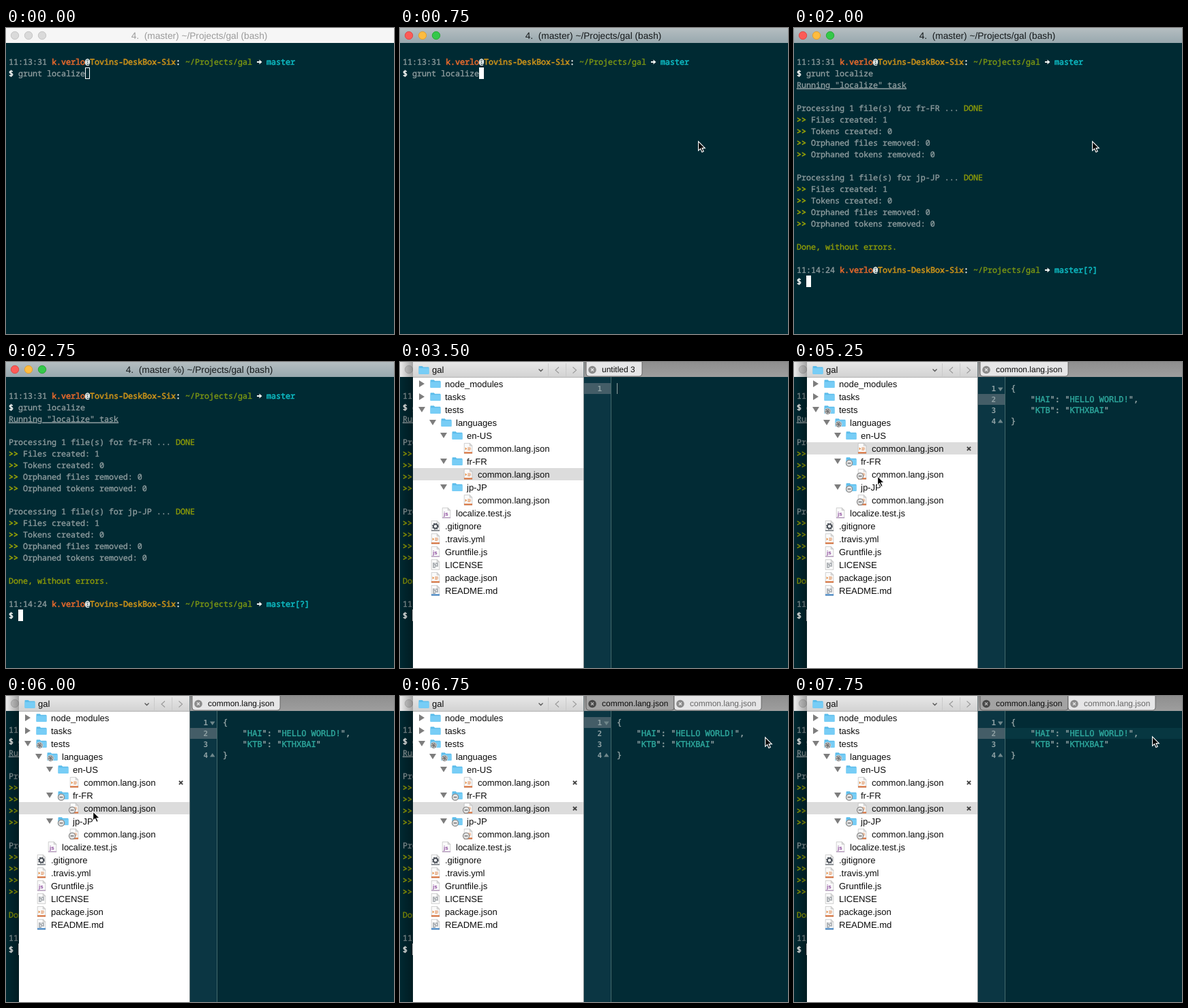
Write an HTML page that moves like this. It is 569 px wide and 450 px high and loops after 8000 ms.

```html
<!DOCTYPE html>
<html lang="en">
<head>
<meta charset="utf-8">
<title>Localize task demo</title>
<style>
  html, body { margin: 0; width: 100%; height: 100%; overflow: hidden; background: #002a33; }
  svg { display: block; }
  text { white-space: pre; text-rendering: geometricPrecision; }
  .ui { font-family: "Liberation Sans", Arial, sans-serif; font-size: 13px; fill: #0c0c0c; }
  .title { font-size: 13.7px; text-anchor: middle; }
  .tab { font-size: 12px; }
  .term { font-family: "Noto Sans Mono", "DejaVu Sans Mono", monospace; font-size: 11.667px; stroke-width: .35px; }
  .strong { stroke-width: .65px; }
  .under { text-decoration: underline 1px; text-underline-offset: 1.8px; }
  .code { font-family: "DejaVu Sans Mono", monospace; font-size: 11.96px; stroke-width: .35px; }
  .num { font-family: "DejaVu Sans Mono", monospace; font-size: 11px; font-weight: bold; text-anchor: end; }
</style>
</head>
<body>
<svg id="stage" width="569" height="450" viewBox="0 0 569 450">
  <defs>
    <linearGradient id="activeBar" x2="0" y2="1">
      <stop stop-color="#b5bec1"/><stop offset="1" stop-color="#98a8ae"/>
    </linearGradient>
    <linearGradient id="paneBar" x2="0" y2="1">
      <stop stop-color="#e8e8e8"/><stop offset="1" stop-color="#d2d2d2"/>
    </linearGradient>
    <linearGradient id="tabBar" x2="0" y2="1">
      <stop stop-color="#8f8f8f"/><stop offset="1" stop-color="#9e9e9e"/>
    </linearGradient>
    <linearGradient id="shade">
      <stop stop-opacity=".04"/><stop offset="1" stop-opacity=".34"/>
    </linearGradient>
    <symbol id="folder" viewBox="0 0 16 16" overflow="visible">
      <path d="M.5 3.2q0-.9.9-.9h4.4l1.3 1.5h7.5q.9 0 .9.9v8.4q0 .9-.9.9H1.4q-.9 0-.9-.9z" fill="#5cbdeb"/>
      <path d="M.5 5.2h15v7.9q0 .9-.9.9H1.4q-.9 0-.9-.9z" fill="#77cdf6"/>
    </symbol>
    <symbol id="page" viewBox="0 0 16 16" overflow="visible">
      <path d="M2.2.6h8l3.6 3.6v11.2H2.2z" fill="#fafafa" stroke="#a4a4a4" stroke-width=".5"/>
      <path d="M10.2.6v3.6h3.6z" fill="#ddd" stroke="#a4a4a4" stroke-width=".4"/>
    </symbol>
    <symbol id="data" viewBox="0 0 16 16" overflow="visible">
      <use href="#page"/>
      <path d="M2 13.4h12v2.1H2z" fill="#d9713a"/>
      <path d="M3.7 6.6l2.5 1.9-2.5 1.9z" fill="#e58a3c"/>
      <path d="M7.2 7h4.5M7.2 8.8h5M7.2 10.4h4" stroke="#dd8a52" stroke-width=".9"/>
    </symbol>
    <symbol id="js" viewBox="0 0 16 16" overflow="visible">
      <use href="#page"/>
      <text x="4.1" y="11.6" font-family="Liberation Sans, sans-serif" font-size="8" font-weight="bold" fill="#8b4a9c">js</text>
      <path d="M2 14.2h12v1.3H2z" fill="#b79ac0"/>
    </symbol>
    <symbol id="gear" viewBox="0 0 16 16" overflow="visible">
      <use href="#page"/>
      <circle cx="8" cy="8.6" r="3.2" fill="none" stroke="#4a5058" stroke-width="2"/>
      <circle cx="8" cy="8.6" r="4.4" fill="none" stroke="#4a5058" stroke-width="1.2" stroke-dasharray="1.7 1.75"/>
      <path d="M2 14.2h12v1.3H2z" fill="#666c73"/>
    </symbol>
    <symbol id="plain" viewBox="0 0 16 16" overflow="visible">
      <use href="#page"/>
      <path d="M4 6h3m1 0h4M4 8h5m1 0h2M4 10h2m1 0h5M4 12h4" stroke="#687078" stroke-width="1"/>
    </symbol>
    <symbol id="doc" viewBox="0 0 16 16" overflow="visible">
      <use href="#plain"/><path d="M2 13.4h12v2.1H2z" fill="#3f83c4"/>
    </symbol>
    <symbol id="minus" viewBox="0 0 16 16" overflow="visible">
      <circle cx="5" cy="10.8" r="4.6" fill="#e4e4e4" stroke="#8a8a8a" stroke-width="1.2"/>
      <path d="M2.6 10.8h4.8" stroke="#777" stroke-width="1.5"/>
    </symbol>
    <symbol id="dots" viewBox="0 0 16 16" overflow="visible">
      <circle cx="5.4" cy="10.6" r="4.6" fill="#777" stroke="#eee" stroke-width=".8"/>
      <circle cx="5.4" cy="10.6" r="2.8" fill="none" stroke="#eee" stroke-width="1.3" stroke-dasharray="1.4 1.5"/>
    </symbol>
  </defs>
</svg>
<script>
const LOOP = 8000, SWITCH = 3500, OPEN_ONE = 4750, OPEN_TWO = 6250;
const stage = document.getElementById('stage');
const timed = [];

function add(parent, tag, attrs, text) {
  const node = document.createElementNS('http://www.w3.org/2000/svg', tag);
  for (const key in attrs) node.setAttribute(key, attrs[key]);
  if (text !== undefined) node.textContent = text;
  parent.appendChild(node);
  return node;
}
function during(node, ...spans) {
  timed.push({ node, spans });
  return node;
}
const group = (parent = stage) => add(parent, 'g', {});
const box = (p, x, y, width, height, fill, more) => add(p, 'rect', { x, y, width, height, fill, ...more });
const path = (p, d, more) => add(p, 'path', { d, fill: 'none', ...more });
const dot = (p, cx, cy, r, fill, stroke = 'none') => add(p, 'circle', { cx, cy, r, fill, stroke });
const label = (p, x, y, text, cls, more) => add(p, 'text', { x, y, class: cls, ...more }, text);
const icon = (p, name, x, y, size = 16) => add(p, 'use', { href: '#' + name, x, y, width: size, height: size });

// Terminal
const GRAY = '#8f9d9f', GREEN = '#8f9d08', WHITE = '#f2f4f2', CYAN = '#0db5bd';
const term = group();
box(term, 0, 0, 569, 450, '#002a33');

function titleBar(fill, ink, lights, rims) {
  const bar = group(term);
  box(bar, 0, 0, 569, 22, fill);
  lights.forEach((color, i) => dot(bar, 13 + 20 * i, 11, 5.7, color, rims[i]));
  const title = mark => label(bar, 283.5, 15.5, `4.  (master${mark}) ~/Projects/gal (bash)`, 'ui title', { style: 'fill:' + ink });
  during(title(''), [0, 2250]);
  during(title(' %'), [2250, LOOP]);
  return bar;
}
const pale = Array(3).fill('#dadada'), paleRim = Array(3).fill('#c6c6c6');
during(titleBar('#f6f6f6', '#9b9b9b', pale, paleRim), [0, 750], [SWITCH, LOOP]);
during(titleBar('url(#activeBar)', '#15191b', ['#fc5b57', '#fdbc40', '#34c84a'], ['#df4744', '#de9f34', '#27aa35']), [750, SWITCH]);

function line(parent, row, ...parts) {
  let col = 0;
  for (const [text, color, cls = ''] of parts) {
    label(parent, 4 + 7 * col, 53.8 + 17 * row, text, 'term ' + cls, { fill: color, stroke: color });
    col += text.length;
  }
}
function prompt(parent, row, time, branch) {
  line(parent, row, [time + ' ', GRAY], ['k.verlo', '#e2682c', 'strong'], ['@', WHITE, 'strong'],
    ['Tovins-DeskBox-Six', '#c58f1a', 'strong'], [':', WHITE, 'strong'], [' ~/Projects/gal ', '#7f9a12'],
    ['  ', WHITE], [branch, CYAN, 'strong']);
  const y = 50 + 17 * row;
  path(parent, `M368 ${y}h4`, { stroke: WHITE, 'stroke-width': 2 });
  path(parent, `M371.5 ${y - 3.5}l4 3.5-4 3.5z`, { fill: WHITE });
}
const dollar = ['$ ', WHITE, 'strong'];

prompt(term, 0, '11:13:31', 'master');
line(term, 1, dollar, ['grunt localize', GRAY]);

const output = during(group(term), [2000, LOOP]);
line(output, 2, ['Running "localize" task', GRAY, 'under']);
['fr-FR', 'jp-JP'].forEach((lang, i) => {
  const top = 4 + 6 * i;
  line(output, top, [`Processing 1 file(s) for ${lang} ... `, GRAY], ['DONE', GREEN]);
  ['Files created: 1', 'Tokens created: 0', 'Orphaned files removed: 0', 'Orphaned tokens removed: 0']
    .forEach((text, n) => line(output, top + 1 + n, ['>> ', GREEN, 'strong'], [text, GRAY]));
});
line(output, 16, ['Done, without errors.', GREEN]);
prompt(output, 18, '11:14:24', 'master[?]');
line(output, 19, dollar);

const block = (col, row) => box(term, 4 + 7 * col, 41 + 17 * row, 7, 17, '#fff');
const hollow = (col, row) => box(term, 4.5 + 7 * col, 41.5 + 17 * row, 6, 16, 'none', { stroke: '#fff' });
during(hollow(16, 1), [0, 750]);
during(block(16, 1), [750, 1500]);
during(block(0, 2), [1500, 2000]);
during(block(2, 19), [2000, SWITCH]);
during(hollow(2, 19), [SWITCH, LOOP]);

// File browser
const editor = during(group(), [SWITCH, LOOP]);
box(editor, 0, 0, 19, 450, 'url(#shade)');
box(editor, 19, 0, 250, 450, '#fff');
box(editor, 19, 0, 250, 22, 'url(#paneBar)');
box(editor, 19, 22, 250, 1, '#b2b2b2');
icon(editor, 'folder', 27, 3.7);
label(editor, 47, 16, 'gal', 'ui');
path(editor, 'M203.5 10.5l3 3 3-3', { stroke: '#555', 'stroke-width': 1.3 });
path(editor, 'M217.5 2v19M243.5 2v19', { stroke: '#cacaca' });
path(editor, 'M233 7.5l-5 4.5 5 4.5M253.5 7.5l5 4.5-5 4.5', { stroke: '#999', 'stroke-width': 1.1 });

const selection = y => box(editor, 19, y, 250, 18, '#dcdcdc');
during(selection(156), [SWITCH, 4500], [6000, LOOP]);
during(selection(118), [4500, 6000]);

const LANG = 'common.lang.json';
// depth, name, icon, fold state, badge
const files = [
  [0, 'node_modules', 'folder', 'shut'],
  [0, 'tasks', 'folder', 'shut'],
  [0, 'tests', 'folder', 'open', 'dots'],
  [1, 'languages', 'folder', 'open', 'dots'],
  [2, 'en-US', 'folder', 'open'],
  [3, LANG, 'data'],
  [2, 'fr-FR', 'folder', 'open', 'minus'],
  [3, LANG, 'data', '', 'minus'],
  [2, 'jp-JP', 'folder', 'open', 'minus'],
  [3, LANG, 'data', '', 'minus'],
  [1, 'localize.test.js', 'js'],
  [0, '.gitignore', 'gear'],
  [0, '.travis.yml', 'data'],
  [0, 'Gruntfile.js', 'js'],
  [0, 'LICENSE', 'plain'],
  [0, 'package.json', 'data'],
  [0, 'README.md', 'doc']
];
files.forEach(([depth, name, kind, fold, badge], i) => {
  const x = 44 + 16 * depth, y = 32 + 19 * i;
  if (fold === 'shut') path(editor, `M${x - 16} ${y - 5}l8 5-8 5z`, { fill: '#7d7d7d' });
  if (fold === 'open') path(editor, `M${x - 17} ${y - 4}h10l-5 8z`, { fill: '#7d7d7d' });
  icon(editor, kind, x, y - 8);
  if (badge) during(icon(editor, badge, x, y - 8), [4000, LOOP]);
  label(editor, x + 22, y + 4.8, name, 'ui');
});
const cross = (p, x, y, r, stroke, width) =>
  path(p, `M${x - r} ${y - r}l${2 * r} ${2 * r}m0 ${-2 * r}l${-2 * r} ${2 * r}`, { stroke, 'stroke-width': width });
during(cross(editor, 256.5, 127.5, 2.6, '#444', 2), [OPEN_ONE, LOOP]);
during(cross(editor, 256.5, 165.5, 2.6, '#444', 2), [OPEN_TWO, LOOP]);

// Code pane
box(editor, 269, 0, 1, 450, '#6d7a7d');
box(editor, 270, 0, 299, 22, 'url(#tabBar)');
box(editor, 270, 22, 299, 428, '#022b35');
box(editor, 270, 22, 39, 428, '#0b3643');
box(editor, 309, 22, 1, 428, '#45696c');

function tab(x, width, text, on, ink = '#0c0c0c') {
  const g = group(editor);
  path(g, `M${x} -1v18q0 4 4 4h${width - 8}q4 0 4-4V-1z`, { fill: on ? '#e6e6e7' : '#a3a3a3', stroke: '#555', 'stroke-width': .8 });
  dot(g, x + 9, 11.5, 5.8, on ? '#8b8b8b' : '#484848');
  cross(g, x + 9, 11.5, 2, on ? '#e4e4e4' : '#b5b5b5', 1.4);
  label(g, x + 23, 15.3, text, 'ui tab', { style: 'fill:' + ink });
  return g;
}
during(tab(273, 82, 'untitled 3', true), [SWITCH, OPEN_ONE]);
during(tab(273, 129, LANG, true), [OPEN_ONE, OPEN_TWO]);
during(tab(273, 129, LANG, false), [OPEN_TWO, LOOP]);
during(tab(402, 128, LANG, true, '#686868'), [OPEN_TWO, LOOP]);

const lineTop = n => 15 + 16 * n;
during(box(editor, 310, lineTop(2), 259, 16, '#073741'), [7500, LOOP]);
const mark = n => box(editor, 270, lineTop(n), 39, 16, '#445d67');
during(mark(1), [SWITCH, OPEN_ONE], [OPEN_TWO, 7000]);
during(mark(2), [OPEN_ONE, OPEN_TWO], [7000, LOOP]);

const number = (p, n) => label(p, 296, lineTop(n) + 12.3, n, 'num', { fill: '#8fa1a4' });
number(editor, 1);
const json = during(group(editor), [OPEN_ONE, LOOP]);
[2, 3, 4].forEach(n => number(json, n));
path(json, 'M299 37.5h7.5l-3.75 5.5z', { fill: '#70878b' });
path(json, 'M299 89.5h7.5l-3.75-5.5z', { fill: '#70878b' });

function code(n, col, ...parts) {
  const t = label(json, 318 + 7.2 * col, lineTop(n) + 12.2, '', 'code');
  for (const [text, color] of parts) add(t, 'tspan', { fill: color, stroke: color }, text);
}
const PUNCT = '#93a3a4', TEAL = '#2fa99e';
const pair = (n, key, value, end) =>
  code(n, 4, ['"', PUNCT], [key, TEAL], ['": "', PUNCT], [value, TEAL], ['"' + end, PUNCT]);
code(1, 0, ['{', PUNCT]);
pair(2, 'HAI', 'HELLO WORLD!', ',');
pair(3, 'KTB', 'KTHXBAI', '');
code(4, 0, ['}', PUNCT]);

const caret = (x, n) => box(editor, x, lineTop(n), 1, 16, '#93a1a1');
during(caret(318, 1), [SWITCH, 4250], [OPEN_TWO, 6750]);
during(caret(318, 2), [OPEN_ONE, 5250]);
during(caret(505, 2), [7000, 7500]);

// Icon that swells out of the file list when a file opens
function swell(y, scale, opacity, badge, from) {
  const g = during(add(stage, 'g', { opacity }), [from, from + 250]);
  const size = 16 * scale, x = 99.5 - size / 2;
  icon(g, 'data', x, y - size / 2, size);
  if (badge) icon(g, 'minus', x, y - size / 2, size);
}
swell(125.8, 3.95, .72, false, OPEN_ONE);
swell(125.8, 7.8, .3, false, 5000);
swell(164, 5.7, .5, true, OPEN_TWO);
swell(164, 8, .22, true, 6500);

// Mouse pointer: time, x, y
const moves = [
  [500, 441, 162], [750, 437, 166], [2750, -50, 0], [4000, 143, 118], [4250, 122, 123],
  [4500, 122, 126], [5250, 122, 167], [5500, 126, 171], [5750, 127, 169],
  [6500, 351, 150], [6750, 535, 60], [7500, 525, 59]
];
const pointer = path(stage, 'M.6.8V14.3L3.6 11.5l2.3 5 2.3-1L6 10.6h4.3z',
  { fill: '#000', stroke: '#fff', 'stroke-width': 1.1 });

const start = performance.now();
function draw() {
  const t = (performance.now() - start) % LOOP;
  for (const { node, spans } of timed)
    node.style.display = spans.some(([a, b]) => t >= a && t < b) ? '' : 'none';
  const [, x, y] = moves.filter(m => m[0] <= t).pop() || [0, -50, 0];
  pointer.setAttribute('transform', `translate(${x} ${y})`);
  requestAnimationFrame(draw);
}
draw();
</script>
</body>
</html>
```
